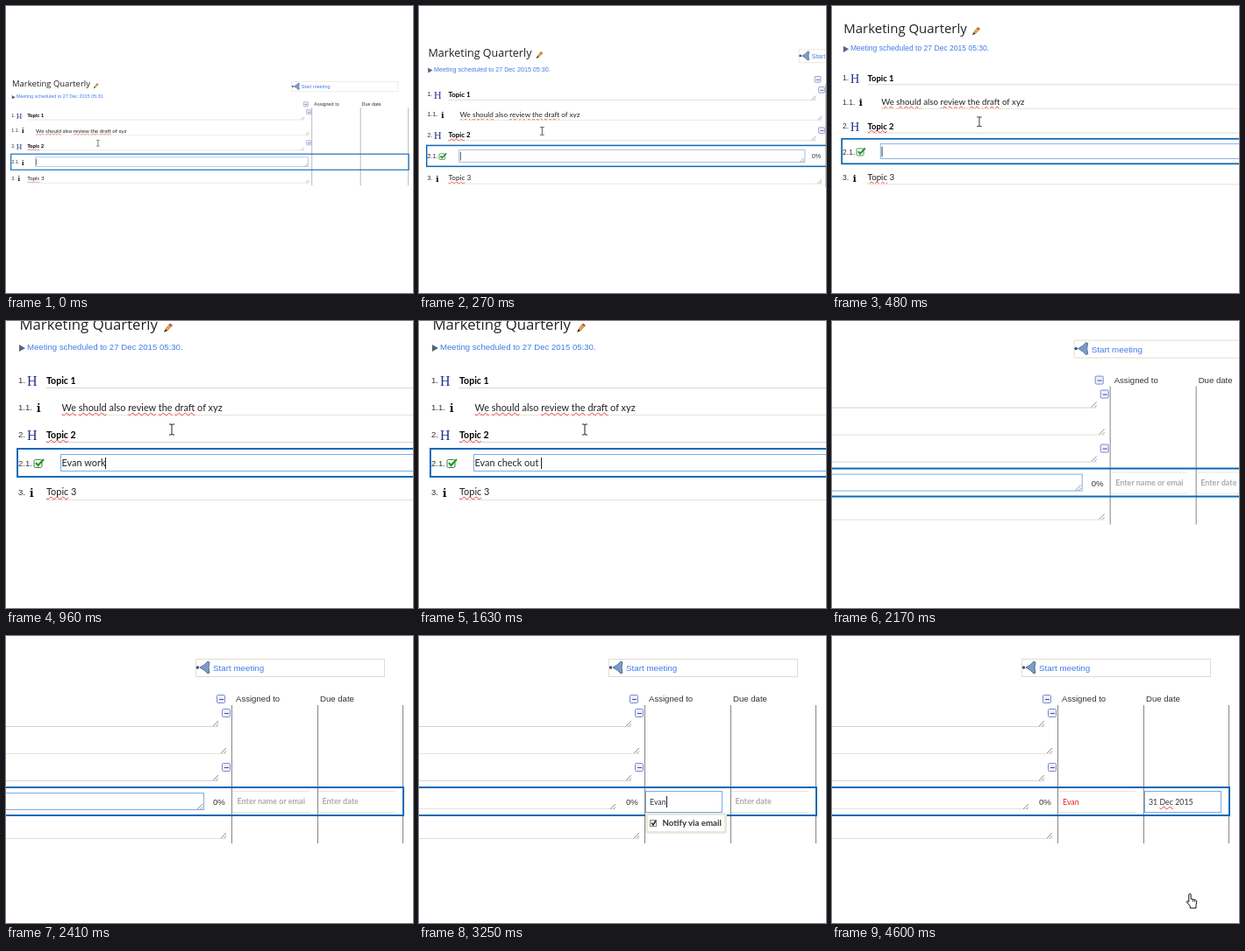
Recreate the animation shown at these times as an HTML page. Size 464 px wide and 328 px high, loop 4.7 s.

```html
<!DOCTYPE html>
<html lang="en">
<head>
<meta charset="utf-8">
<title>Meeting minutes</title>
<style>
html, body { margin: 0; width: 100%; height: 100%; overflow: hidden; background: #fff; }
#stage { position: fixed; inset: 0; overflow: clip; contain: strict; }
#page { position: absolute; left: 0; top: 0; width: 100%; height: 100%; transform-origin: 0 0; }
.at { position: absolute; box-sizing: border-box; }
.text { white-space: pre; line-height: 0; font: 9.6px/0 "Liberation Sans", Arial, sans-serif; color: #333; }
.title { font: 16.8px/0 "Open Sans", sans-serif; color: #222; }
.link { color: #3f7de8; }
.note { font: 10.95px/0 Lato, sans-serif; color: #222; }
.topic { font-weight: 700; font-size: 10.6px; color: #000; }
.head { font: 16px/0 "Liberation Serif", serif; color: #22308f; }
.info { font: 900 13px/0 "Noto Serif", serif; color: #000; }
.small { font: 8.8px/0 Lato, sans-serif; color: #333; }
.hint { font: 700 9px/0 Lato, sans-serif; color: #aaa; width: 77px; height: 16px; margin-top: -8px; line-height: 16px; overflow: hidden; }
.notify { font: 700 9.7px/0 Lato, sans-serif; }
.day { font: 7px/0 "Liberation Sans", sans-serif; width: 12px; text-align: center; }
.field { border: 1px solid #e6e6e6; border-width: 1px 0; }
.focus { border: 1px solid #7fabe2; }
.collapse { border: 1px solid #7e88cc; border-radius: 1.5px; background: #eef0fb linear-gradient(#3b48a8, #3b48a8) center / 5px 1px no-repeat; }
[hidden] { display: none !important; }
u { text-decoration: underline wavy #e8403a .7px; text-underline-offset: 1px; text-decoration-skip-ink: none; }
i { position: absolute; width: 1px; height: 13px; margin-top: -6.5px; background: #222; }
svg { overflow: visible; }
</style>
</head>
<body>
<div id="stage"><div id="page"></div></div>
<script>
const page = document.getElementById('page');
const LOOP = 4700, CARET = '<i></i>', NAME = 'Evan';

function add(x, y, cls, html = '', parent = page) {
  const el = document.createElement('div');
  el.className = 'at ' + cls;
  el.style.left = x + 'px';
  el.style.top = y + 'px';
  el.innerHTML = html;
  parent.append(el);
  return el;
}
const text = (x, y, html, cls = '', parent) => add(x, y, 'text ' + cls, html, parent);
function box(x, y, w, h, css = '', cls = '', parent) {
  const el = add(x, y, cls, '', parent);
  el.style.cssText += `width:${w}px;height:${h}px;${css}`;
  return el;
}
const icon = (x, y, shapes) => add(x, y, '', `<svg class="at" width="1" height="1">${shapes}</svg>`);
const rule = (x, y, end, color) => box(x, y, end - x, 1, `background:${color}`);
const grip = (x, y) => icon(x, y, '<path d="M-6 0L0-6M-2.5 0L0-2.5" stroke="#777" stroke-width=".8"/>');
const collapse = (x, y) => box(x - 5, y - 5, 10, 10, '', 'collapse');

// Heading area
text(12.4, 31.2, 'Marketing Quarterly', 'title');
icon(176.5, 40, '<path d="M1-1L2-4 7-10 9.5-8 4-2z" fill="#eda63c" stroke="#9a6a2a" stroke-width=".7"/><path d="M0 0L2-3.5 3.7-2z" fill="#222"/><path d="M7-10L9.5-8 8.6-6.8 6-8.8z" fill="#b5453a"/>');
icon(12, 57.5, '<path d="M0-4L7 0 0 4z" fill="#56647c"/>');
text(21, 57, 'Meeting scheduled to 27 Dec 2015 05:30.', 'link');
box(577, 26, 216, 21, 'border:1px solid #e0ddd0');
icon(577, 36, '<path d="M5 0Q11-3 14-7L16-6 15 0 16 6 14 7Q11 3 5 0z" fill="#7c9cc8" stroke="#3c5c8c" stroke-width=".8"/><circle cx="2.5" cy="0" r="1.8" fill="#3d5678"/>');
text(597, 36.5, 'Start meeting', 'link').style.fontSize = '9.8px';
text(623, 72, 'Assigned to');
text(719, 72, 'Due date');

// Agenda rows
for (const x of [618, 716, 813]) box(x, 79, 1, 158, 'background:#858585');
rule(43, 103, 603, '#d4d4d4');
rule(61, 134, 612, '#e6e3d8');
rule(43, 165, 603, '#d4d4d4');
rule(43, 231, 612, '#e0ded6');
[[603, 102.5], [612, 133.5], [603, 164.5], [612, 230.5]].forEach(p => grip(...p));
[[606, 72], [612, 88], [612, 150]].forEach(p => collapse(...p));
[['1.', 95], ['1.1.', 126], ['2.', 157], ['2.1.', 190], ['3.', 222.5]].forEach(([n, y]) => text(11, y, n));
text(21, 95.5, 'H', 'head');
text(21, 157.5, 'H', 'head');
text(32, 126, 'i', 'info');
text(24, 222.5, 'i', 'info');
text(43, 94.5, 'Topic 1', 'note topic');
text(60.5, 125.5, '<u>We</u> <u>should</u> also <u>review</u> <u>the</u> <u>draft</u> of xyz', 'note');
text(43, 156.5, '<u>Topic</u> 2', 'note topic');
text(43, 222, '<u>Topic</u> 3', 'note');

// Active row
box(9, 172, 806, 34, 'border:2px solid #0d69b6');
const infoIcon = text(32, 190, 'i', 'info');
const taskIcon = icon(34, 190, '<rect x="-5" y="-4.5" width="9" height="9" rx="1.5" fill="#fff" stroke="#3f7d3f"/><path d="M-3-1L-.5 2 6-5" fill="none" stroke="#1f9a2a" stroke-width="2.2"/>');
const area = box(59, 179, 552, 20, '', 'focus');
const areaLine = rule(61, 197, 585, '#e2e2e2');
const gripWide = grip(610, 198), gripTask = grip(585, 197.5);
const note = text(60.5, 189, '', 'note');
const percent = text(597, 189.5, '0%');
const who = box(619, 177, 88, 25, '', 'field');
const when = box(716.5, 177, 88, 25, '', 'field');
const whoHint = text(624.5, 189, 'Enter name or email', 'hint');
const whenHint = text(721.5, 189, 'Enter date', 'hint');
const whoText = text(624, 189.5, '', 'small');
const whenText = text(722, 189.5, '', 'small');

const popup = box(619, 202, 93, 24, 'border:3px solid #ebe8dc;border-radius:3px;background:#fff');
box(2, 5, 8, 8, 'border:1px solid #888', '', popup);
add(3, 5, '', '<svg class="at" width="7" height="7"><path d="M1 3.5L3 6 6 1" fill="none" stroke="#222" stroke-width="1.5"/></svg>', popup);
text(16.5, 8, 'Notify via email', 'notify', popup);

// Date picker, weeks start on Monday
const picker = box(716, 206, 101, 118, 'border:1px solid #bbb;background:#fff');
box(2, 2, 95, 17, 'background:#e8e8e8', '', picker);
text(20, 10.5, 'December 2015', '', picker).style.fontSize = '8px';
const cell = (col, y, s) => text(6 + col * 12.4, y, s, 'day', picker);
['Mo', 'Tu', 'We', 'Th', 'Fr', 'Sa', 'Su'].forEach((d, i) => cell(i, 27, d));
for (let d = 1; d < 32; d++) cell(d % 7, 41 + 13.5 * Math.floor(d / 7), d);

// Pointers
icon(186, 151, '<path d="M-3-6H-1Q0-6 0-5 0-6 1-6H3M-3 6H-1Q0 6 0 5 0 6 1 6H3M0-5V5" fill="none" stroke="#222"/>');
const arrow = icon(0, 0, '<path d="M0 0v13l3-3 2 4.5 2-1-2-4.3h4z" fill="#fff" stroke="#000" stroke-width=".8"/>');
const hand = icon(0, 0, '<path d="M-1.2.8Q0-.7 1.2.8V6l5 1.2Q8 7.7 7.8 9.5L7 13v3.5H.3v-2.3L-3.6 9.5Q-3.3 7.3-1.2 9.3z" fill="#fff" stroke="#111"/><path d="M3.3 6.5v3M5.6 7.2v2.5" stroke="#111" stroke-width=".7"/>');

const ramp = (t, a, b) => Math.min(1, Math.max(0, (t - a) / (b - a)));
const mix = (a, b, p) => a + (b - a) * p;
const show = (el, on) => { el.hidden = !on; };
const fill = (el, html) => { if (el.last !== html) el.innerHTML = el.last = html; };
const typed = (s, t, start, done = 0) => s.slice(0, Math.max(0, done + 1 + Math.floor((t - start) / 30)));

function noteAt(t) {
  if (t < 1320) return typed(NAME + ' work', t, 720);
  if (t < 1350) return NAME + ' ';
  if (t < 1380) return NAME + ' ch';
  if (t < 1540) return NAME + ' check ';
  return typed(NAME + ' check out the new website', t, 1540, 11);
}

function draw(t) {
  const zoom = ramp(t, 0, 640), pan = ramp(t, 1660, 2270);
  const x = mix(0, 3, zoom) - 364 * pan, y = mix(71.6, -27, zoom) + 27 * pan;
  page.style.transform = `translate(${x}px,${y}px) scale(${mix(.564, 1, zoom)})`;

  const task = t >= 240, named = t >= 2870, dated = t >= 3410, picked = t >= 4250;
  show(infoIcon, !task);
  show(gripWide, !task);
  [taskIcon, gripTask, percent, who, when].forEach(el => show(el, task));
  area.style.width = (task ? 527.5 : 552) + 'px';
  show(area, !named);
  show(areaLine, named);
  const caret = !named && !(t >= 1160 && t < 1320) ? CARET : '';
  fill(note, noteAt(t).replace(/\b(the|new) /g, '<u>$1</u> ') + caret);

  who.className = 'at ' + (named && !dated ? 'focus' : 'field');
  when.className = 'at ' + (dated ? 'focus' : 'field');
  show(whoHint, task && !named);
  show(whenHint, task && !dated);
  fill(whoText, named ? typed(NAME, t, 3160) + (dated ? '' : CARET) : '');
  whoText.style.color = dated ? '#e02020' : '#333';
  show(popup, named && !dated);

  show(picker, dated && !picked);
  const day = t >= 4440 ? '31 <u>Dec</u> 2015' : '31 Dec 2015';
  const blink = picked ? t < 4600 : dated && t % 1000 < 900;
  fill(whenText, (picked ? day : '') + (blink ? CARET : ''));

  const move = ramp(t, 3570, 4090);
  const px = mix(449, 769, move), py = mix(240, 294.5, move);
  const inside = px > 716;
  for (const el of [arrow, hand]) el.style.transform = `translate(${px}px,${py}px)`;
  show(arrow, t >= 3570 && !inside);
  show(hand, t >= 3570 && inside);
}

let start;
function tick(now) {
  start ??= now;
  draw((now - start) % LOOP);
  requestAnimationFrame(tick);
}
draw(0);
requestAnimationFrame(tick);
</script>
</body>
</html>
```
